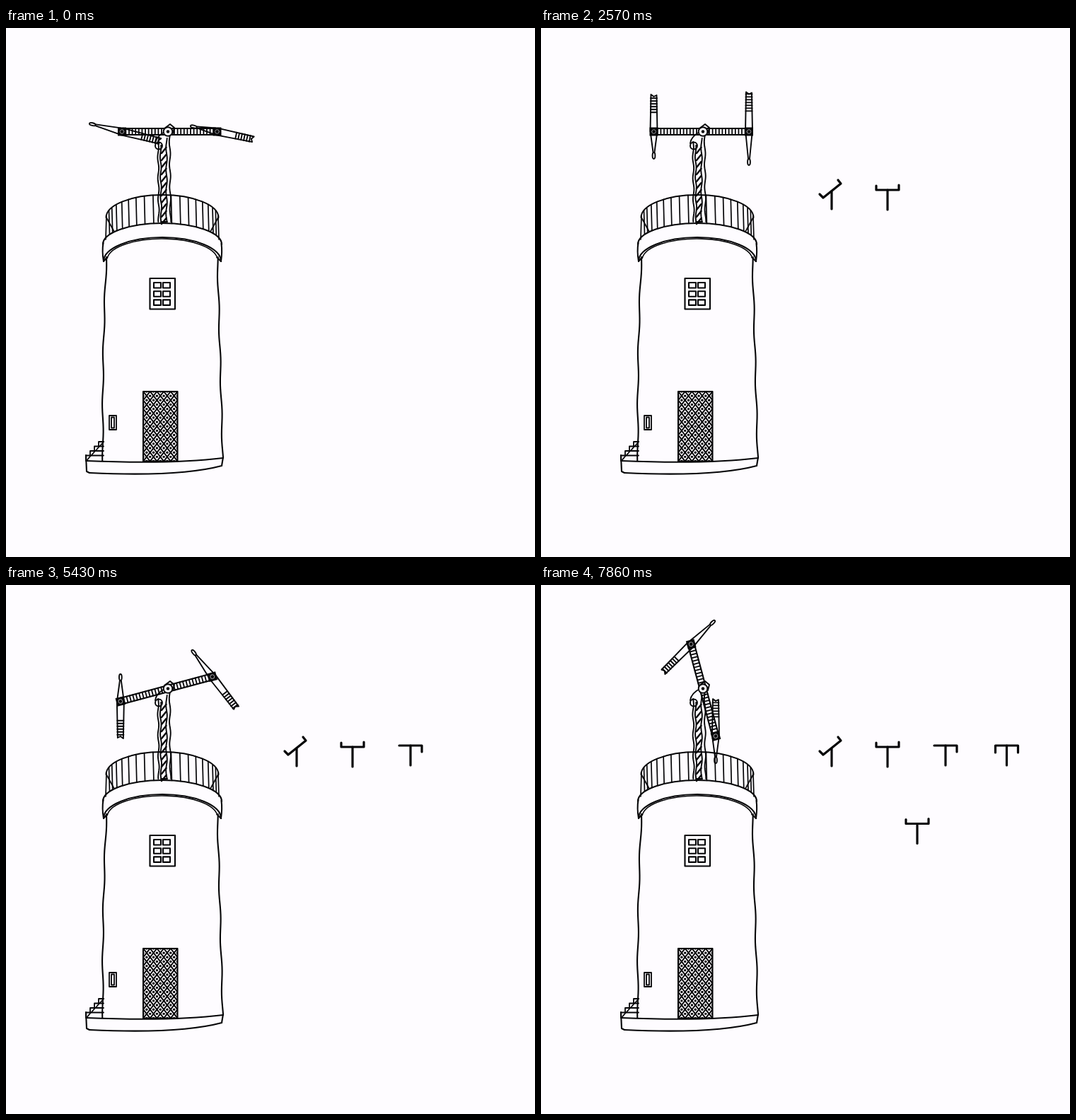
Write an HTML page with a canvas that moves like this. It is 748 px wide and 748 px high and loops after 8 s.

```html
<!DOCTYPE html>
<html lang="en">
<head>
<meta charset="utf-8">
<title>Semaphore tower</title>
<style>
  html, body { margin: 0; width: 100%; height: 100%; overflow: hidden; background: #fefcff; }
  canvas { display: block; width: 100vw; height: 100vh; }
</style>
</head>
<body>
<canvas id="stage"></canvas>
<script>
const SIZE = 748, LOOP = 8000, STEP = 1000 / 7;
const INK = '#050507', PAPER = '#fefcff';
const CX = 221;
const canvas = document.getElementById('stage');
const ratio = window.devicePixelRatio || 1;
canvas.width = canvas.height = SIZE * ratio;
const ctx = canvas.getContext('2d');

// Degrees turned in each move: beam, arm A, arm B.
const rest = [0, 12, 14];
const turns = [
  [323, 581, 579], [-143, -323, -323], [-180, -540, 90],
  [180, 0, 450], [-180, 180, -540], [180, 0, 540]
];
const startOf = move => 1 + 10 * move + (move > 1 ? 2 : 0);

const rad = d => d * Math.PI / 180;

function pen(width) { ctx.lineWidth = width; }

function line(...pts) {
  ctx.beginPath();
  pts.forEach(([x, y]) => ctx.lineTo(x, y));
  ctx.stroke();
}

function bow(x1, y1, mx, my, x2, y2) {
  ctx.beginPath();
  ctx.moveTo(x1, y1);
  ctx.quadraticCurveTo(mx, my, x2, y2);
  ctx.stroke();
}

// A nearly upright line with a hand-drawn waver.
function wavy(x1, y1, x2, y2, bulge, phase) {
  ctx.beginPath();
  for (let u = 0; u <= 1.001; u += .02) {
    const waver = bulge * Math.sin(u * Math.PI) + .8 * Math.sin(u * 24 + phase);
    ctx.lineTo(x1 + (x2 - x1) * u + waver, y1 + (y2 - y1) * u);
  }
  ctx.stroke();
}

function dot(x, y, r, fill, stroke) {
  ctx.beginPath();
  ctx.arc(x, y, r, 0, 7);
  if (fill) { ctx.fillStyle = fill; ctx.fill(); }
  if (stroke) ctx.stroke();
}

// Upper half of an ellipse, as used by rail and deck.
const rim = (x, base, rx, ry) => base - ry * Math.sqrt(Math.max(0, 1 - ((x - CX) / rx) ** 2));

function arch(base, rx, ry, from = 180, to = 360) {
  ctx.beginPath();
  ctx.ellipse(CX, base, rx, ry, 0, rad(from), rad(to));
  ctx.stroke();
}

function drawRailing() {
  pen(2);
  arch(268, 79.5, 32);
  pen(1.7);
  for (let i = 1; i < 18; i++) {
    const x = CX - 78 * Math.cos(i * Math.PI / 18 * .94 + .09);
    if (Math.abs(x - CX) < 8) continue;
    line([x, rim(x, 268, 79.5, 32)], [x + 1, rim(x + 1, 306, 84, 30)]);
  }
  for (const side of [-1, 1]) {
    const x = CX + side * 79;
    line([x, 266], [x + side, 299]);
    line([x, 268], [x - side * 11, 288]);
  }
}

function drawDeck() {
  pen(2.1);
  arch(306, 84, 30);
  arch(330, 83, 34);
  pen(1.6);
  arch(328, 78, 30, 185, 350);
  pen(2);
  bow(137.5, 304, 135.5, 316, 138, 330);
  bow(304.5, 305, 306, 316, 304, 330);
  line([138, 330], [143, 324]);
  line([304, 330], [298, 324]);
}

function drawMast() {
  pen(1.9);
  wavy(215, 161, 216, 274, 0, 0);
  wavy(218.5, 166, 219.5, 274, 0, 1);
  wavy(227, 156, 227, 274, 0, 2);
  wavy(231.5, 153, 232.5, 274, 0, 3);
  line([219, 274], [228, 274]);
  pen(2.4);
  for (let y = 172; y < 274; y += 10) line([220, y + 5], [226.5, y - 3]);
  pen(1.9);
  dot(216, 166.5, 5, null, true);
  bow(211, 163, 212, 153, 226, 146);
  line([224, 142], [232, 136], [238, 141], [236, 149]);
}

function drawDoor() {
  const x = 194, y = 514, w = 48.5, h = 98.5, dx = w / 5, dy = h / 8;
  ctx.save();
  ctx.beginPath();
  ctx.rect(x, y, w, h);
  ctx.clip();
  pen(2);
  for (let i = -8; i < 14; i++) {
    line([x + i * dx, y], [x + (i + 8) * dx, y + h]);
    line([x + i * dx, y], [x + (i - 8) * dx, y + h]);
  }
  for (let row = 0; row <= 16; row++)
    for (let i = 0; i < 6; i++)
      dot(x + (i + (row % 2 ? 0 : .5)) * dx, y + row * dy / 2, 1.7, INK);
  ctx.restore();
  pen(2.1);
  ctx.strokeRect(x, y, w, h);
}

function drawWindows() {
  pen(2.1);
  ctx.strokeRect(203.5, 354, 35.5, 43.5);
  for (let row = 0; row < 3; row++)
    for (let col = 0; col < 2; col++)
      ctx.strokeRect(209 + col * 13, 360 + row * 12.2, 10, 7.5);
  pen(1.8);
  ctx.strokeRect(146, 548, 10, 20);
  ctx.strokeRect(149, 550.5, 4, 15);
}

function drawStairs() {
  pen(1.8);
  for (let i = 0; i < 4; i++) {
    const x = 131 - i * 6, y = 585 + i * 6.5;
    line([138, y], [x, y], [x, y + 6.5]);
    line([x + 2, y + 6], [x + 7, y]);
  }
}

function drawTower() {
  pen(2.1);
  wavy(142, 324, 137, 612, -2, 0);
  wavy(299, 324, 306.5, 608, 0, 2);
  line([113, 604], [114, 627], [118, 629]);
  bow(118, 629, 245, 635, 305, 619);
  line([305, 619], [307, 607]);
  bow(113, 612, 235, 617, 307, 608);
  drawStairs();
  drawWindows();
  drawDoor();
}

function drawArm(x, y, angle, len, tail) {
  ctx.save();
  ctx.translate(x, y);
  ctx.rotate(rad(angle));
  pen(1.9);
  line([0, -5], [len, -4], [len - 3, 0], [len - 1, 4], [0, 5]);
  for (let u = len * .52; u < len - 2; u += 4) line([u, -4.5], [u, 4.5]);
  // Tapered tail with a small loop
  line([-3, -4.5], [9 - tail, -1]);
  line([-3, 4.5], [9 - tail, 1]);
  ctx.beginPath();
  ctx.ellipse(4 - tail, 0, 4.5, 1.9, 0, 0, 7);
  ctx.stroke();
  ctx.restore();
}

function drawJoint(u) {
  ctx.fillStyle = INK;
  ctx.fillRect(u - 6, -6, 12, 12);
  pen(1);
  ctx.strokeStyle = '#99989c';
  dot(u, 0, 2.8, null, true);
  ctx.strokeStyle = INK;
}

function drawMachine([beam, armA, armB]) {
  const x = 229, y = 146.5, a = 69.5, b = 65;
  const c = Math.cos(rad(beam)), s = Math.sin(rad(beam));
  drawArm(x + a * c, y + a * s, armA, 52.5, 38);
  drawArm(x - b * c, y - b * s, armB, 56, 47);
  ctx.save();
  ctx.translate(x, y);
  ctx.rotate(rad(beam));
  pen(2.1);
  for (const edge of [-4.5, 4.5]) line([-b, edge], [a, edge]);
  pen(1.8);
  for (let u = 9; u < b; u += 4.6)
    for (const v of [-u, u]) line([v, -4.5], [v, 4.5]);
  drawJoint(a);
  drawJoint(-b);
  ctx.restore();
  pen(1.9);
  dot(x, y, 6.3, PAPER, true);
  dot(x, y, 2.2, INK);
}

// A T-shaped sign; left and right are the tick heights, downwards positive.
function drawTee(x, y, left, right) {
  line([x - 16, y + left], [x - 16, y], [x + 16, y], [x + 16, y + right]);
  line([x, y], [x, y + 28]);
}

const signs = [
  () => {
    line([394, 235], [399, 240], [424, 220], [420, 215]);
    line([411, 231], [411, 256]);
  },
  () => drawTee(490, 229, -6, -7),
  () => drawTee(572, 227, 0, 9),
  () => drawTee(658.5, 227, 10, 10),
  () => drawTee(532, 337.5, -6, -7)
];

function render(now) {
  const tick = Math.floor((now % LOOP + 3) / STEP);
  let move = 0;
  while (move < 5 && tick >= startOf(move + 1)) move++;
  const step = tick - startOf(move) + 1;
  const p = Math.min(1, Math.max(0, (step - .5) / 6));
  const pose = rest.map((v, i) =>
    turns.slice(0, move).reduce((sum, t) => sum + t[i], v) + turns[move][i] * p);

  ctx.setTransform(ratio, 0, 0, ratio, 0, 0);
  ctx.fillStyle = PAPER;
  ctx.fillRect(0, 0, SIZE, SIZE);
  ctx.strokeStyle = INK;
  ctx.lineCap = ctx.lineJoin = 'round';
  drawRailing();
  drawDeck();
  drawTower();
  drawMast();
  drawMachine(pose);
  pen(3.2);
  signs.slice(0, move + (step >= 8 ? 1 : 0)).forEach(draw => draw());
}

let origin;
function frame(now) {
  origin ??= now;
  render(now - origin);
  requestAnimationFrame(frame);
}
render(0);
requestAnimationFrame(frame);
</script>
</body>
</html>
```
